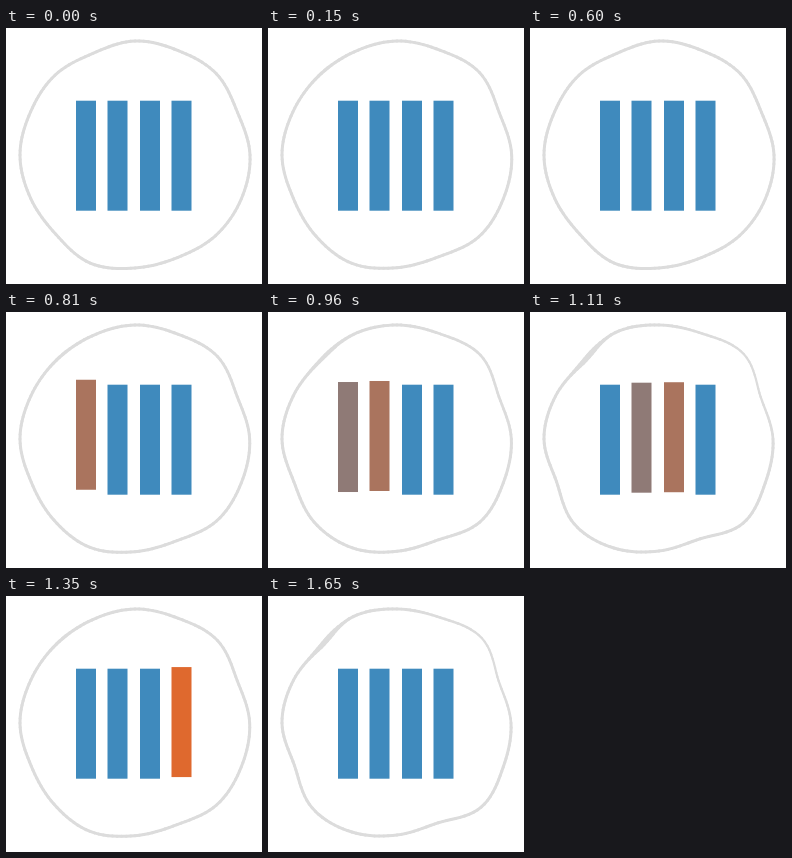
Recreate the animation shown at these times as an HTML page with a canvas. Size 256 by 256 pixels, loop 1.8 s.

```html
<!DOCTYPE html>
<html lang="en">
<head>
<meta charset="utf-8">
<title>Bars in a wobbling ring</title>
<style>
html, body { margin: 0; width: 100%; height: 100%; overflow: hidden; background: #fff; }
canvas { display: block; }
</style>
</head>
<body>
<canvas id="stage" width="256" height="256"></canvas>
<script>
const ctx = document.getElementById('stage').getContext('2d');
const LOOP = 1800, STEP = 30, TAU = 2 * Math.PI;
const RING_HOLD = 150, RING_POSES = 4;
const BAR_COUNT = 4, BAR_START = 750, BAR_STAGGER = 150, BAR_TIME = 240;
const BLUE = [63, 138, 189], ORANGE = [223, 105, 46];

// Ring radii at equal angles, clockwise from the right, relaxed and squashed.
const RELAXED = [115, 115, 114, 111, 113, 117, 112, 113, 115, 113, 113, 110, 114, 113, 115, 111];
const SQUASHED = [114, 115, 119, 108, 112, 118, 120, 111, 115, 112, 108, 115, 114, 114, 120, 110];

const mix = (a, b, u) => a + (b - a) * u;
const bell = (x, center, width) => Math.exp(-(((x - center) / width) ** 2));

function spline(a, b, c, d, u) {
  return b + u / 2 * (c - a + u * (2 * a - 5 * b + 4 * c - d + u * (3 * (b - c) + d - a)));
}

function drawRing(squash) {
  const radii = RELAXED.map((r, i) => mix(r, SQUASHED[i], squash));
  const count = radii.length, parts = 10;
  const at = i => radii[(i + count) % count];
  const pointAt = k => {
    const i = Math.floor(k / parts);
    const r = spline(at(i - 1), at(i), at(i + 1), at(i + 2), k % parts / parts);
    const angle = k / (count * parts) * TAU;
    return [129 + r * Math.cos(angle), 127 + r * Math.sin(angle)];
  };
  ctx.strokeStyle = '#dcdcdc';
  ctx.lineCap = 'round';
  for (let k = 0; k < count * parts; k++) {
    const turn = k / (count * parts);
    ctx.lineWidth = 3 + squash ** 2 * (2.6 * bell(turn, .635, .025) - .8 * bell(turn, .9, .1));
    ctx.beginPath();
    ctx.moveTo(...pointAt(k));
    ctx.lineTo(...pointAt(k + 1));
    ctx.stroke();
  }
}

function drawBar(index, time) {
  const local = Math.max(0, Math.min(BAR_TIME, time - BAR_START - index * BAR_STAGGER));
  const lift = 1.75 * (BAR_COUNT - index) * Math.sin(Math.PI * local / BAR_TIME);
  const heat = Math.min(1, local / 90, (BAR_TIME - local) / 60);
  const color = BLUE.map((c, n) => Math.round(mix(c, ORANGE[n], heat)));
  ctx.fillStyle = `rgb(${color})`;
  ctx.fillRect(70 + index * 32 - index % 2 / 2, 72.7 - lift, 20, 110);
}

function draw(now) {
  const time = Math.floor(now % LOOP / STEP) * STEP;
  const pose = Math.floor(time / RING_HOLD) % RING_POSES;
  ctx.fillStyle = '#fff';
  ctx.fillRect(0, 0, 256, 256);
  drawRing(pose / (RING_POSES - 1));
  for (let i = 0; i < BAR_COUNT; i++) drawBar(i, time);
}

const start = performance.now();
function tick() {
  draw(performance.now() - start);
  requestAnimationFrame(tick);
}
tick();
</script>
</body>
</html>
```
